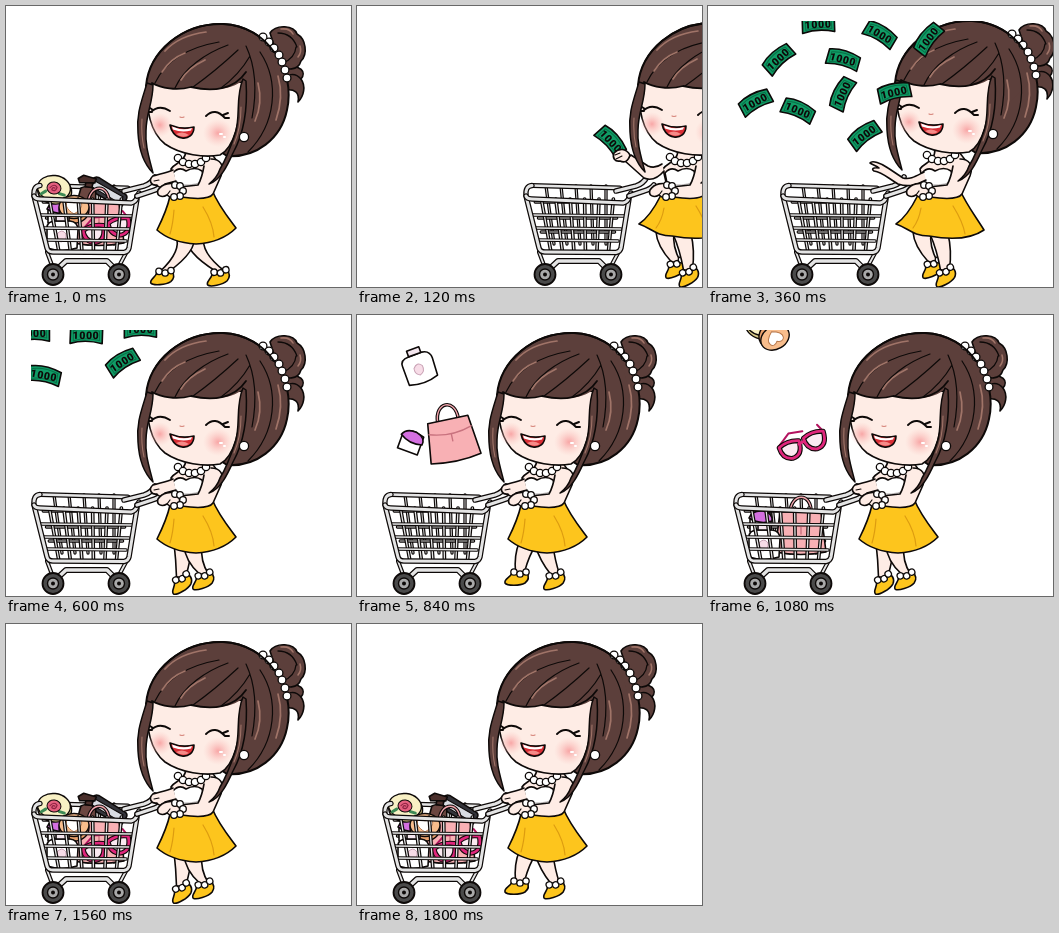
Write an HTML page that moves like this. It is 345 by 281 pixels and loops after 1920 ms.

```html
<!DOCTYPE html>
<html lang="en">
<head>
<meta charset="utf-8">
<title>Shopping spree</title>
<style>
html, body { margin: 0; width: 100%; height: 100%; overflow: hidden; background: #fff; }
svg { display: block; width: 100%; height: 100%; }
</style>
</head>
<body>
<svg id="stage" viewBox="0 0 345 281" stroke-linecap="round" stroke-linejoin="round">
  <defs>
    <clipPath id="frame"><rect x="25" y="15" width="320" height="266"/></clipPath>
    <radialGradient id="blush">
      <stop offset="0" stop-color="#f79a9b" stop-opacity=".85"/>
      <stop offset="1" stop-color="#fbc5c0" stop-opacity="0"/>
    </radialGradient>
  </defs>
  <g id="scene" clip-path="url(#frame)"></g>
</svg>
<script>
const STEP = 120, COUNT = 16;
const INK = '#0d0908', SKIN = '#feece5', HAIR = '#5c3f3b', SHINE = '#a07468',
      GOLD = '#fdc51d', METAL = '#e4e4e4', GREEN = '#109c66';

const path = (d, fill = 'none', stroke = INK, w = 1.6) =>
  `<path d="${d}" fill="${fill}" stroke="${stroke}" stroke-width="${w}"/>`;
const oval = (x, y, rx, ry, fill, w = 1.4) =>
  `<ellipse cx="${x}" cy="${y}" rx="${rx}" ry="${ry}" fill="${fill}" stroke="${INK}" stroke-width="${w}"/>`;
const pearl = (x, y, r = 3.6) => oval(x, y, r, r, '#fff', 1.3);
const pearls = (pts, r) => pts.map(p => pearl(p[0], p[1], r)).join('');
const move = (x, y, body, rot = 0) =>
  `<g transform="translate(${x} ${y}) rotate(${rot})">${body}</g>`;
const pipe = (d, w) => path(d, 'none', INK, w + 2.4) + path(d, 'none', METAL, w);

// ---------- cart ----------
function backCart() {
  let s = '';
  for (let i = 1; i < 6; i++) s += pipe(`M${33 + i * 15} 180L${43 + i * 13} 238`, 0.9);
  for (const y of [196, 212, 226]) s += pipe(`M${36 + (y - 190) * .2} ${y}L${122 - (y - 190) * .15} ${y}`, 0.9);
  return s + pipe('M34 179.5L122 182', 2.4);
}

function wheel(x) {
  return oval(x, 268.5, 10.5, 10.5, '#4a4a4a', 1.8) + oval(x, 268.5, 5.5, 5.5, '#a9a9a9', 1.4) +
    `<circle cx="${x}" cy="268.5" r="2" fill="${INK}"/>`;
}

function frontCart() {
  let s = pipe('M41 246L47 262M120 247L112 262', 1.8) +
    pipe('M47 267L60 255L101 255L113 267', 3.6) + wheel(47) + wheel(113);
  for (let i = 1; i < 7; i++) s += pipe(`M${29 + i * 14.4} 193L${41 + i * 11.6} 244`, 1.3);
  for (const [y, a] of [[209, 34], [222, 37], [234, 40]])
    s += pipe(`M${a} ${y}L${160 - a} ${y + 1}`, 1.3);
  return s + pipe('M34 179.5Q27 180 28 190L41 242Q42 246 47 246L118 246.500Q122 246 123 242L131 193', 3) +
    pipe('M28 190Q29 193 34 193L125 197Q130 196 131 191L133 187', 3) +
    pipe('M118 185L138 180Q145 178 149 171', 3.2) +
    pipe('M131 190L146 185Q153 183 156 179', 3.2);
}

// ---------- purchases, each drawn around 0,0 ----------
const bag = path('M-11 -17C-10 -38 11 -38 10 -17', 'none', INK, 3.6) +
  path('M-11 -17C-10 -38 11 -38 10 -17', 'none', '#f3a6ae', 1.4) +
  path('M-21 -18L20 -18L25 22Q0 27 -26 22Z', '#f8b0b4') +
  path('M-22 -7Q0 0 21 -7M0 -3L0 4', 'none', '#c9737f', 1.4);
const bottle = path('M-15 -7Q-15 -14 -6 -14L8 -14Q16 -13 16 -5L15 13Q0 18 -15 13Z', '#fff') +
  path('M-6 -14L-6 -20L7 -20L7 -14Z', '#f4e6ee') +
  path('M-5 -1Q0 -7 4 -1Q5 5 -1 7Q-6 5 -5 -1', '#f7dce7', '#c9a2b5', 1);
const purple = path('M-10 12L-10 -2Q-7 -9 2 -9L11 -7L11 12Z', '#fff') +
  path('M-11 -2Q-8 -10 3 -9Q13 -7 12 1Q0 5 -11 -2Z', '#d46fe0');
const lens = (x, y) => path(`M${x - 10} ${y - 5}Q${x} ${y - 10} ${x + 11} ${y - 6}Q${x + 11} ${y + 9} ${x} ${y + 9}Q${x - 10} ${y + 7} ${x - 10} ${y - 5}Z`, '#fbe9f1', INK, 5) +
  path(`M${x - 10} ${y - 5}Q${x} ${y - 10} ${x + 11} ${y - 6}Q${x + 11} ${y + 9} ${x} ${y + 9}Q${x - 10} ${y + 7} ${x - 10} ${y - 5}Z`, 'none', '#e0267c', 2.8);
const glasses = path('M-22 -5L-10 -14L4 -12M24 -6L20 -14', 'none', '#b31460', 2) + lens(-13, 2) + lens(13, 0) +
  path('M-3 -1L3 -2', 'none', '#e0267c', 3);
const jar = oval(0, 1, 15, 13, '#e9a06c') + oval(0, -2, 15, 11.5, '#f8bd8c') +
  path('M0 5C-14 -3 -6 -12 0 -6C6 -12 14 -3 0 5Z', '#fff', '#b8784c', 1);
const pump = path('M-9 16L-7 1Q0 -4 8 1L10 16Z', '#6b4640') + path('M-3 -1L-3 -7L4 -7L4 -1Z', '#4a2f2b') +
  path('M-11 -8L-6 -12L7 -10L6 -6L-9 -4Z', '#4a2f2b');
const compact = oval(1, 3, 17, 13, '#d8ca88') + oval(0, 0, 16.5, 12.5, '#f8f0c4') +
  path('M-8 4L-12 7M6 5L11 6', 'none', '#3d8a55', 3) +
  oval(0, 0, 7, 6, '#e4607f', 1) + path('M-4 0Q0 -5 3 -1Q2 4 -2 2Q-2 -1 1 0', 'none', '#8f2444', 1.2);
const phone = path('M-18 -8Q-16 -12 -12 -11L17 2Q20 4 18 8L15 14Q12 16 9 14L-21 2Q-24 0 -22 -3Z', '#34343a') +
  path('M-15 -7L15 5L11 11L-18 -1Z', '#d9dce2', INK, 1);

// step of landing, resting x and y, drop per step, drift, tilt in the air, tilt at rest
const GOODS = [
  [phone, 13, 103, 184, 82, 1, 0, 8],
  [pump, 11, 82, 182, 95, 0, 30, 8],
  [bag, 8, 93, 215, 93, 2, -12, 0],
  [purple, 8, 52, 205, 80, 2, 20, 0],
  [compact, 12, 48, 182, 58, 2, 12, 6],
  [jar, 11, 68, 203, 91, -1, 150, 0],
  [bottle, 9, 56, 229, 88, 3, -20, 0],
  [glasses, 10, 100, 223, 94, -6, -17, -12]
];

function goods(n, inside) {
  return GOODS.map(([art, land, x, y, drop, drift, air, rest]) => {
    const left = Math.max(0, land - n);
    if ((left === 0) !== inside) return '';
    return move(x + drift * left, y - drop * left, art, left ? air : rest);
  }).join('');
}

// ---------- money ----------
const note = path('M-16 -5Q-2 -11 16 -7L17 7Q0 4 -15 10Z', GREEN, INK, 1.6) +
  path('M-13 -3Q-1 -8 13 -5L14 4Q0 2 -12 7Z', 'none', '#087047', 1) +
  `<text x="0" y="4" text-anchor="middle" font-family="Roboto, sans-serif" font-weight="900" font-size="10.5" letter-spacing=".6" transform="rotate(-5)" fill="${INK}">1000</text>`;

// x, y, angle, then change of each per step
const NOTES = [
  [70, 53, -38, -22, -40, 8], [110, 18, 2, -20, -45, 5], [135, 53, 20, -22, -40, 6],
  [172, 28, 35, -20, -45, 5], [220, 33, -48, -22, -45, 9], [47, 96, -24, -10, -39, 14],
  [90, 104, 28, -26, -22, -6], [134, 88, -60, -27, -34, 33], [186, 86, -8, -26, -36, 6],
  [156, 129, -32, -20, -41, 2]
];

function money(n) {
  if (n < 2 || n > 6) return '';
  return NOTES.map(([x, y, a, vx, vy, va]) => {
    const t = n - 3;
    const px = t < 0 ? 212 + (x - 212) * .55 : x + vx * t;
    const py = t < 0 ? 132 + (y - 132) * .55 : y + vy * t;
    return move(px, py, note, a + va * t);
  }).join('');
}

// ---------- girl ----------
function leg([hx, hy, kx, ky, ax, ay, rot]) {
  const shoe = path('M-8 1C-10 6 -16 7 -15 11C-13 14 0 14 5 11C9 8 9 4 7 0Z', GOLD);
  return path(`M${hx - 9} ${hy}Q${kx - 8} ${ky} ${ax - 4.5} ${ay}L${ax + 4.5} ${ay}Q${kx + 7} ${ky} ${hx + 9} ${hy}`, SKIN) +
    move(ax, ay, shoe + pearls([[-6, 0], [0, 2], [6, 0]], 3.2), rot);
}

const WIDE = [[189, 230, 187, 246, 214, 265, -12], [179, 230, 184, 245, 159, 265, -4]];
const CROSS = [[177, 228, 178, 245, 175, 262, -30], [187, 230, 187, 246, 198, 259, -18]];
const STAND = [[171, 228, 165, 240, 163, 257, 0], [187, 230, 191, 246, 198, 259, -18]];
const KICK = [[167, 226, 167, 240, 178, 256, -22], [184, 228, 190, 244, 190, 264, -28]];

function legs(n) {
  const pose = n < 4 ? [WIDE, KICK, WIDE, KICK][n] : [WIDE, CROSS, WIDE, STAND][n % 4];
  return pose.map(leg).join('');
}

function skirt(throwing) {
  return throwing
    ? path('M163 189C157 201 150 212 141 218C153 222 158 230 174 230C196 234 216 233 229 224C221 211 211 198 205 184Q184 193 163 189Z', GOLD) +
      path('M166 202Q164 214 158 222M198 200Q208 216 210 228', 'none', '#dd9c10', 1.2)
    : path('M164 190C161 204 155 216 151 224C160 232 174 237 190 238C208 237 222 230 230 222C221 210 212 199 206 184Q185 194 164 190Z', GOLD) +
      path('M168 204Q167 218 164 228M197 201Q207 217 208 231', 'none', '#dd9c10', 1.2);
}

const torso =
  path('M180 143L203 143C205 151 211 151 211 157L204 187Q186 193 165 190L168 176L165 163C169 156 180 157 180 143Z', SKIN) +
  path('M167 167Q173 160 180 165Q189 160 196 165L203 184Q186 192 165 190L169 177Z', '#fff') +
  path('M171 178Q183 181 196 176', 'none', '#b9b4b4', 1);

const nearArm =
  path('M205 153C214 153 219 159 215 170L207 188C203 194 189 193 175 191L174 181L192 179C196 172 197 166 198 160', SKIN) +
  path('M173 180C165 175 156 178 152 184C150 190 156 192 161 189C165 193 170 192 174 190Z', SKIN) +
  path('M161 189L164 185', 'none', INK, 1.2) +
  pearls([[169, 179], [174, 180], [177, 185], [174, 190], [168, 191]], 3.3);

function farArm(n) {
  if (n === 1 || n === 2) {
    const held = move(113, 135, note, 52);
    return (n === 1 ? held : '') +
      path('M166 165C160 172 153 175 146 172L127 155L133 149L150 160Q157 163 164 158', SKIN) +
      path('M132 149C128 142 121 142 116 147C114 152 117 156 122 155C126 157 130 156 132 149Z', SKIN) +
      path('M117 149L122 147M118 153L124 150', 'none', INK, 1.1);
  }
  if (n === 3)
    return path('M169 166C161 170 155 174 148 172L133 162C126 157 117 154 115 157C118 159 122 160 124 162C118 161 116 163 119 165C127 166 133 172 143 178C155 182 163 178 171 174', SKIN);
  return path('M167 164C160 167 153 168 147 170C142 174 145 180 151 179C153 183 158 181 159 178L170 175', SKIN) +
    path('M148 175L153 174', 'none', INK, 1.1);
}

const backHair =
  path('M281 62C294 58 301 66 295 73C300 80 298 90 292 96C294 86 288 83 280 84Z', HAIR) +
  path('M264 27C270 18 288 19 291 28C300 33 302 48 295 55C292 65 280 65 274 58Z', HAIR) +
  path('M272 27Q286 27 291 41M277 57Q289 52 290 41M283 69Q290 67 295 73', 'none', INK, 1.3) +
  path('M275 23Q284 22 287 28M294 40Q296 46 292 51', 'none', SHINE, 1.6) +
  path('M141 80C143 46 176 17 217 18C262 20 290 64 281 104C275 133 250 152 221 150L190 130Z', HAIR, INK, 2) +
  pearls([[257, 31], [263, 36], [268, 42], [273, 49], [276, 56], [279, 64], [281, 72]], 3.9);

const face =
  path('M142 78C139 104 145 127 159 138C175 149 199 152 214 149C227 142 235 118 236 76Z', SKIN) +
  '<ellipse cx="154" cy="119" rx="12" ry="12" fill="url(#blush)"/>' +
  '<ellipse cx="212" cy="127" rx="15" ry="14" fill="url(#blush)"/>' +
  path('M145 106Q153 98 164 105M144 102L147 104M142 106L146 106', 'none', INK, 1.9) +
  path('M200 110Q209 101 219 112M217 109L222 107M219 112L223 112', 'none', INK, 1.9) +
  path('M174 111Q176 112 178 111', 'none', '#d98c82', 1.2) +
  path('M164 119Q176 124 188 121C188 129 182 133 176 132C169 131 165 125 164 119Z', '#d92e35', INK, 1.6) +
  path('M166 120.500Q176 125 186 122L185 124.500Q176 127 167 123.500Z', '#fff', 'none', 0) +
  path('M170 128Q177 124.500 183 129Q177 133 170 128Z', '#f58b88', 'none', 0) +
  path('M214 128L216 128M218 131L219 131', 'none', '#fff', 2);

const fringe =
  path('M140 80C143 46 176 18 217 19C250 21 270 48 272 82L244 110L239 72C228 84 206 86 185 81C170 85 155 82 146 77Z', HAIR, 'none', 0) +
  path('M146 77C155 82 170 85 185 81C206 86 228 84 240 66', 'none', INK, 1.8) +
  path('M140 80C143 46 176 17 217 18C240 19 258 31 268 46', 'none', INK, 2) +
  path('M213 36C184 41 160 54 149 77M222 39C200 47 178 62 169 82M232 44C218 57 204 69 187 81M244 50Q233 69 215 82M240 40Q254 70 246 112M254 46C274 76 270 118 242 146', 'none', INK, 1.2) +
  path('M159 45C170 33 184 28 200 26M156 66Q164 53 179 47M175 74Q182 62 199 54M272 70Q278 91 270 114M252 77Q257 97 249 115', 'none', SHINE, 1.7);

const locks =
  path('M141 77C136 94 130 108 132 127C133 145 139 159 147 167C143 151 139 139 140 125C140 108 147 96 147 79Z', HAIR, INK, 1.5) +
  path('M237 73C229 91 235 112 229 128C224 143 219 155 214 163Q211 172 203 178C215 174 222 158 227 147C237 129 242 105 240 75Z', HAIR, INK, 1.5) +
  path('M136 113Q135 129 138 142M235 101Q235 122 228 138', 'none', SHINE, 1.1) +
  pearl(238, 131, 4.6);

const necklace = pearls([[172, 152], [177, 156], [183, 158], [189, 158], [195, 156], [200, 152]], 3.7);

// ---------- assembly ----------
const scene = document.getElementById('scene');
const LIFT = [0, -1, -2, -3];

function draw(k) {
  const shift = k > 0 && k < 4 ? 47 * (4 - k) : 0;
  const lift = LIFT[k] || 0;
  const stock = k || COUNT;
  const up = body => move(0, lift, body);
  const girl = up(backHair) + legs(k) + skirt(shift > 0) + torso +
    backCart() + (shift ? '' : goods(stock, true)) + frontCart() +
    farArm(k) + nearArm + up(necklace + face + fringe + locks);
  scene.innerHTML = move(shift, 0, girl) + money(k) + (k > 4 ? goods(k, false) : '');
}

let shown = -1;
const start = performance.now();
function tick(now) {
  const k = Math.floor(Math.max(0, now - start) / STEP) % COUNT;
  if (k !== shown) draw(shown = k);
  requestAnimationFrame(tick);
}
tick(start);
</script>
</body>
</html>
```
